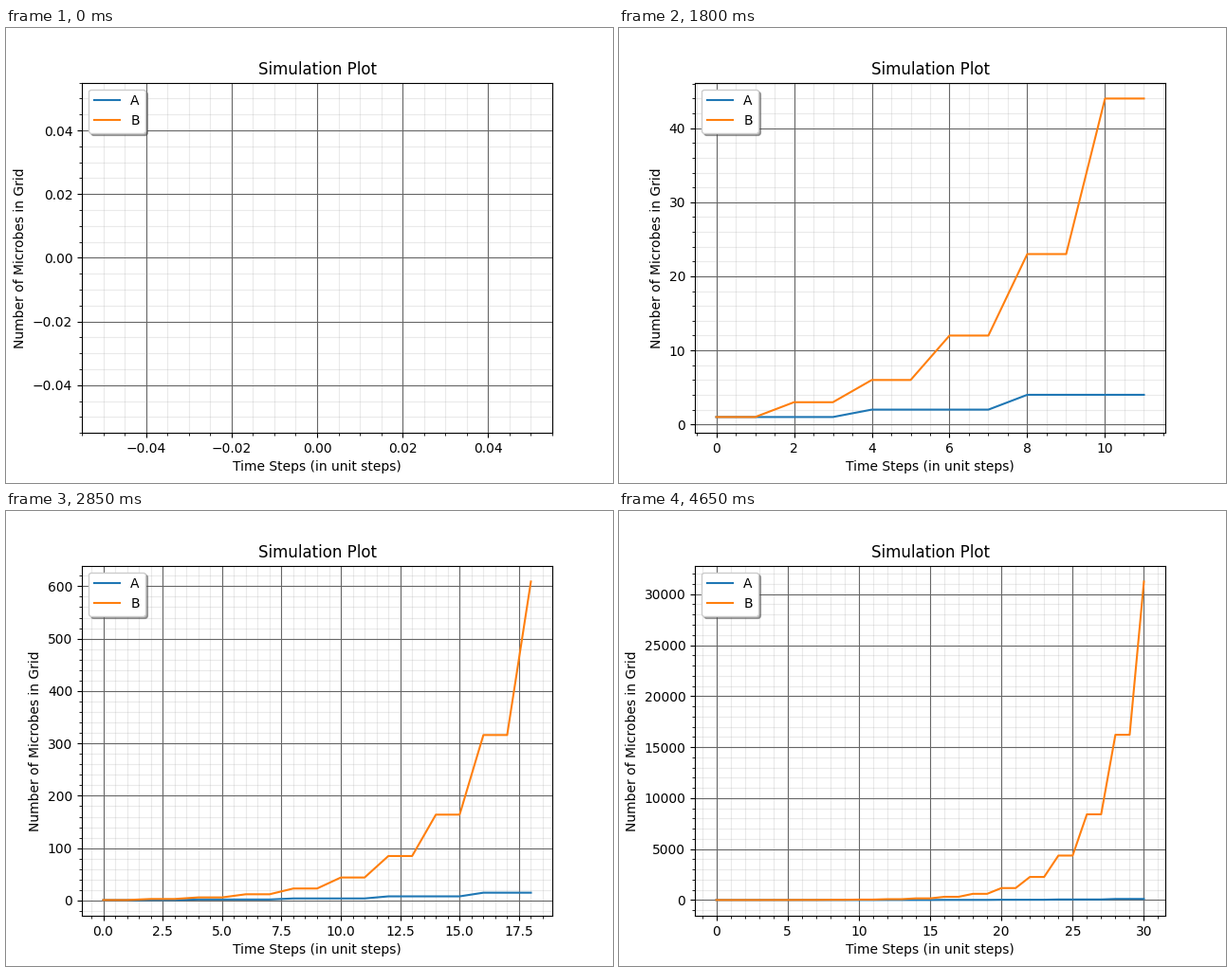
Recreate the animation shown at these times as a matplotlib script. Size 640 px wide and 480 px high, loop 8000 ms.

```python
import matplotlib.pyplot as plt
import numpy as np
from matplotlib.animation import FuncAnimation

TICK_MS = 50        # animation interval
TICKS_PER_STEP = 3  # a new point every 150 ms
POINTS = 31
LOOP_MS = 8000


def population(seed, hold):
    """Each generation is the sum of the previous four, held for some steps."""
    sizes = list(seed)
    while len(sizes) * hold < POINTS:
        sizes.append(sum(sizes[-4:]))
    return np.repeat(sizes, hold)[:POINTS]


steps = np.arange(POINTS)
series = {
    "A": population([1, 2, 4, 8], hold=4),
    "B": population([1, 3, 6, 12, 23], hold=2),
}

fig, ax = plt.subplots(figsize=(6.4, 4.8), dpi=100)
lines = {name: ax.plot([], [], label=name)[0] for name in series}
ax.set_title("Simulation Plot")
ax.set_xlabel("Time Steps (in unit steps)")
ax.set_ylabel("Number of Microbes in Grid")
ax.legend(loc="upper left", shadow=True)
ax.minorticks_on()
ax.grid(which="major", color="#666666", linestyle="-")
ax.grid(which="minor", color="#999999", linestyle="-", alpha=0.2)


def update(tick):
    count = min(tick // TICKS_PER_STEP, POINTS)
    for name, line in lines.items():
        line.set_data(steps[:count], series[name][:count])
    ax.relim()
    ax.autoscale_view()
    return list(lines.values())


anim = FuncAnimation(fig, update, frames=LOOP_MS // TICK_MS,
                     init_func=lambda: update(0), interval=TICK_MS,
                     repeat=True, repeat_delay=0)
plt.show()
```
